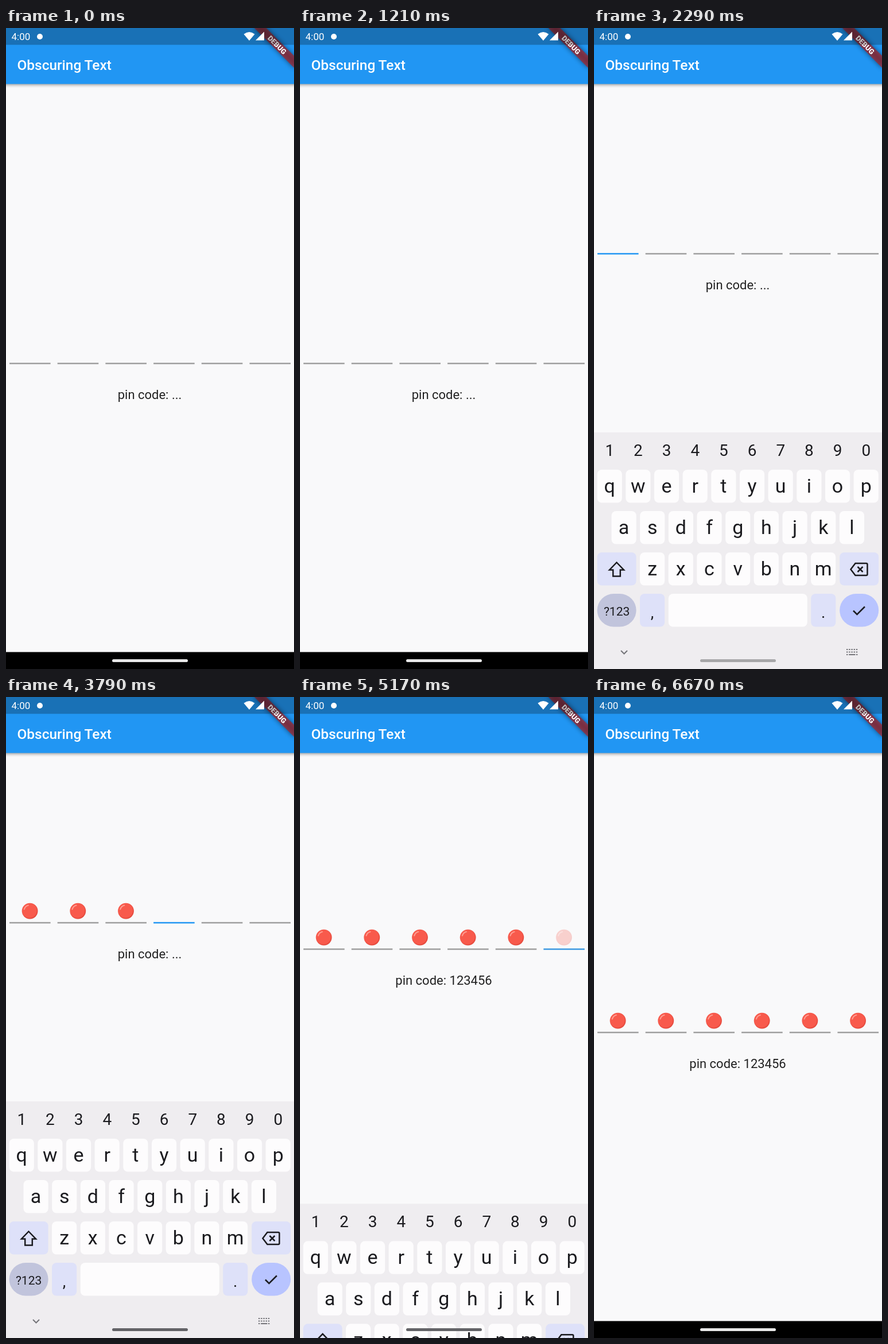
These frames come from a looping animation (502 px wide and 1116 px high, 6.71 s). An HTML page:

```html
<!DOCTYPE html>
<html lang="en">
<head>
<meta charset="utf-8">
<title>Obscuring Text</title>
<style>
  @property --top { syntax: "<length>"; inherits: false; initial-value: 1116px; }
  html, body { margin: 0; width: 100%; height: 100%; overflow: hidden; background: #f9f9fa; }
  svg { display: block; width: 502px; height: 1116px; font-family: Roboto, sans-serif; }
  #bar { filter: drop-shadow(0 2px 2.5px rgba(0, 0, 0, .36)); }
  #form { transform: translateY(calc((min(1086px, var(--top)) - 1086px) / 2)); }
  #keys { transform: translateY(calc(var(--top) - 704px)); }
  #form text { font-size: 22px; fill: #212121; text-anchor: middle; }
  #keys text { fill: #1b1b1f; text-anchor: middle; }
  .icon { fill: none; stroke: #1b1b1f; stroke-width: 2.5; }
  .small { fill: none; stroke: #75757a; stroke-width: 2; }
</style>
</head>
<body>
<svg viewBox="0 0 502 1116">
  <defs>
    <radialGradient id="red" cx=".47" cy=".46" r=".56">
      <stop offset=".78" stop-color="#f85a4c"/>
      <stop offset="1" stop-color="#dc4034"/>
    </radialGradient>
    <filter id="blur" x="-30%" y="-120%" width="160%" height="340%">
      <feGaussianBlur stdDeviation="4.2"/>
    </filter>
  </defs>

  <rect width="502" height="1116" fill="#f9f9fa"/>

  <g id="form">
    <g id="fields"></g>
    <text id="empty" x="250.5" y="646">pin code: ...</text>
    <text id="full" x="250.5" y="646">pin code: 123456</text>
  </g>

  <rect id="bar" x="-10" y="-10" width="522" height="107.5" fill="#2196f3"/>
  <text x="19.5" y="73" font-size="24.4" font-weight="500" fill="#fff">Obscuring Text</text>

  <g transform="translate(502 0) rotate(45)">
    <rect x="-48.9" y="34.2" width="97.8" height="14.7" fill="#000" opacity=".5" filter="url(#blur)"/>
    <rect x="-48.9" y="34.2" width="97.8" height="14.7" fill="#b71c1c" opacity=".63"/>
    <text y="46" font-size="12.5" font-weight="900" fill="#fff" text-anchor="middle">DEBUG</text>
  </g>

  <rect width="502" height="29.3" fill="#000" opacity=".25"/>
  <g fill="#fff">
    <text x="9.5" y="21.3" font-size="17">4:00</text>
    <circle cx="59" cy="15" r="5"/>
    <path d="M424 22L414.5 10.7Q424 3.3 433.5 10.7Z"/>
    <path d="M450 6.5V21.5H435Z"/>
  </g>

  <rect y="1086.5" width="502" height="29.5" fill="#000"/>

  <g id="keys">
    <rect y="704" width="502" height="412" fill="#efedf0"/>
    <g id="caps"></g>
    <path class="icon" d="M39.5 930.5L52 943.5H45.8V954.5H33.2V943.5H27Z"/>
    <path class="icon" d="M455.5 932H474.5Q476.5 932 476.5 934V951Q476.5 953 474.5 953H455.5L447.5 942.5ZM459.5 938L468.5 947M468.5 938L459.5 947"/>
    <path class="icon" d="M452 1014.5L458.5 1021L472 1007.5"/>
    <path class="small" d="M47 1084L52.5 1089.5L58 1084"/>
    <path class="small" stroke-dasharray="2.4 1.8" d="M440 1082H460M440 1086.5H460"/>
    <path class="small" d="M440 1091H442.4M444.2 1091H455.5M457 1091H459.4"/>
  </g>

  <rect id="pill" x="185" y="1099" width="132" height="5" rx="2.5" fill="#e8e8e8"/>
</svg>

<script>
const LOOP = 6710;
const $ = id => document.getElementById(id);

function add(parent, tag, attrs, text) {
  const el = document.createElementNS("http://www.w3.org/2000/svg", tag);
  for (const k in attrs) el.setAttribute(k, attrs[k]);
  if (text) el.textContent = text;
  return parent.appendChild(el);
}

// Each step is [time in ms, value, easing to the next step].
function loop(el, prop, steps) {
  const all = [[0, steps[0][1]], ...steps, [LOOP, steps[steps.length - 1][1]]];
  const frames = all.map(([t, v, easing = "linear"]) => ({ offset: t / LOOP, [prop]: v, easing }));
  const anim = el.animate(frames, { duration: LOOP, iterations: Infinity });
  anim.startTime = 0 + start;
}
const start = document.timeline.currentTime || 0;

// Keyboard keys
const caps = $("caps"), PITCH = 49.67;
const WHITE = "#fdfcfd", TINT = "#dee1f9";

function key(x, y, w, fill, label, size = 34, drop = 11.5, r = 8) {
  add(caps, "rect", { x, y, width: w, height: 57.5, rx: r, fill });
  if (label) add(caps, "text", { x: x + w / 2, y: y + 28.5 + drop, "font-size": size }, label);
}
[..."1234567890"].forEach((c, i) =>
  add(caps, "text", { x: 27.3 + i * PITCH, y: 744.5, "font-size": 28 }, c));
[["qwertyuiop", 5.6, 769], ["asdfghjkl", 30.5, 841], ["zxcvbnm", 80, 913]].forEach(([row, x, y]) =>
  [...row].forEach((c, i) => key(x + i * PITCH, y, 43.2, WHITE, c)));
key(5.6, 913, 68, TINT);
key(428.2, 913, 68, TINT);
key(5.6, 985, 68, "#c1c4dc", "?123", 21, 9, 28.7);
key(80, 985, 43.2, TINT, ",", 28, 13.5);
key(129.8, 985, 242, WHITE);
key(378.2, 985, 43.2, TINT, ".", 28, 13.5);
key(428.2, 985, 68, "#b8c4ff", "", 0, 0, 28.7);

// Pin fields
const typed = [2480, 3000, 3520, 4040, 4560, 5120];
const GREY = "#9e9e9e", BLUE = "#2196f3";

typed.forEach((t, i) => {
  const x = 6 + i * 83.7, cx = x + 35.6;
  const line = add($("fields"), "rect", { x, y: 582.8, width: 71.6, height: 2.5, fill: GREY });
  const on = i ? typed[i - 1] : 1330;
  const off = i === 5 ? 5140 : t;
  loop(line, "fill", [[on, GREY], [on + 150, BLUE], [off, BLUE], [off + 150, GREY]]);

  const dot = add($("fields"), "g", { opacity: 0 });
  add(dot, "circle", { cx, cy: 563.6, r: 13.9, fill: "url(#red)" });
  add(dot, "path", {
    d: `M${cx - 9.8} 560.5Q${cx - 8} 555 ${cx - 2.8} 553.8`,
    fill: "none", stroke: "#ff9c90", "stroke-width": 2.2, "stroke-linecap": "round"
  });
  loop(dot, "opacity", [[t, 0], [t + 200, 1]]);
});

loop($("empty"), "opacity", [[5100, 1, "step-end"], [5101, 0]]);
loop($("full"), "opacity", [[5100, 0, "step-end"], [5101, 1]]);

// Keyboard slide; the form follows it slightly late
function slide(el, show, hide) {
  loop(el, "--top", [
    [show, "1116px", "cubic-bezier(0,0,.2,1)"], [show + 275, "704px"],
    [hide, "704px", "cubic-bezier(.4,0,1,1)"], [hide + 200, "1116px"]
  ]);
}
slide($("keys"), 1378, 5052);
slide($("form"), 1396, 5091);

const LIGHT = "#e8e8e8", DARK = "#636367";
loop($("pill"), "fill", [[2000, LIGHT], [2600, DARK], [5260, DARK], [5560, LIGHT]]);
</script>
</body>
</html>
```
